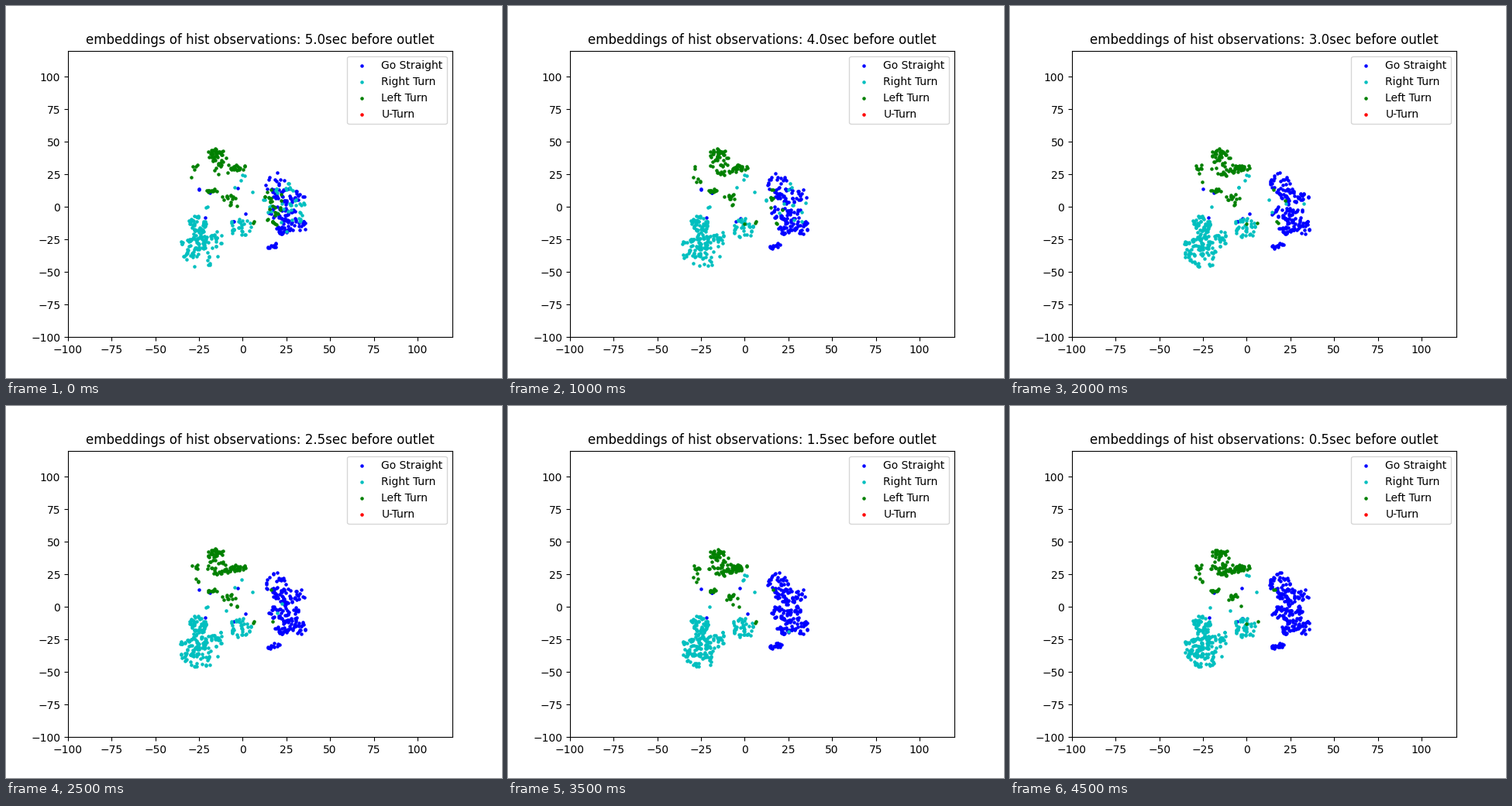
Recreate the animation shown at these times as a matplotlib script. Size 640 px wide and 480 px high, loop 5000 ms.

```python
import numpy as np
import matplotlib.pyplot as plt
from matplotlib.animation import FuncAnimation

FRAMES = 10
INTERVAL = 500
FADE = 0.55  # share of mixed-in dots kept from one step to the next

# Clusters are ellipses: centre x, y, radius x, y, first and last dot count
STRAIGHT = [
    (19, 18, 6, 8, 18, 40),
    (27, 9, 9, 6, 38, 58),
    (24, -5, 9, 7, 36, 62),
    (28, -16, 9, 6, 48, 56),
    (17, -30, 4, 2.5, 10, 22),
]
RIGHT = [
    (-26, -14, 5, 7, 58, 66),
    (-28, -28, 8, 6, 48, 52),
    (-25, -38, 11, 8, 28, 72),
    (-16, -24, 5, 7, 22, 26),
    (-1, -15, 6, 8, 28, 48),
]
LEFT = [
    (-15, 38, 5, 7, 46, 34),
    (-12, 29, 9, 4, 8, 56),
    (-3, 30, 4, 3, 20, 24),
    (-26, 25, 4, 8, 5, 13),
    (-18, 13, 3, 2, 12, 9),
    (-8, 8, 4, 3, 10, 12),
]
STRAYS = (-5, 3, 25, 23, 8, 5)


def make_sites(cluster, size, rng):
    """Sites spread over an ellipse, some of them in tight clumps."""
    x, y, rx, ry = cluster[:4]
    knots = int(0.6 * size) + 1
    angle = rng.uniform(0, 2 * np.pi, knots)
    radius = np.sqrt(rng.random(knots))
    base = np.column_stack([x + rx * radius * np.cos(angle),
                            y + ry * radius * np.sin(angle)])
    return base[np.arange(size) % knots] + rng.normal(0, 0.5, (size, 2))


def make_steps(clusters, mix, seed):
    """Dots of one class for every step, picked anew from fixed sites."""
    rng = np.random.default_rng(seed)
    groups = clusters + [STRAYS, mix]
    sites = [make_sites(g, int(1.3 * max(g[4:])) + 1, rng) for g in groups]
    steps = []
    for step in range(FRAMES):
        part = step / (FRAMES - 1)
        counts = [g[4] + (g[5] - g[4]) * part for g in groups]
        counts[-1] = mix[4] * FADE ** step
        steps.append(np.vstack([rng.permutation(s)[:round(n)]
                                for s, n in zip(sites, counts)]))
    return steps


fig, ax = plt.subplots(figsize=(6.4, 4.8), dpi=100)
ax.set(xlim=(-100, 120), ylim=(-100, 120),
       xticks=range(-100, 101, 25), yticks=range(-100, 101, 25))

# The last ellipse of each class mixes into the right-hand cluster and fades
classes = [
    ("Go Straight", "b", make_steps(STRAIGHT, (25, -8, 9, 12, 0, 0), 3)),
    ("Right Turn", "c", make_steps(RIGHT, (23, 1, 12, 22, 45, 0), 5)),
    ("Left Turn", "g", make_steps(LEFT, (18, 1, 7, 14, 28, 0), 8)),
    ("U-Turn", "r", [np.empty((0, 2))] * FRAMES),
]
clouds = [ax.scatter([], [], s=5, c=color, label=label)
          for label, color, _ in classes]
ax.legend(loc="upper right")
title = ax.set_title("")


def update(step):
    for cloud, (_, _, steps) in zip(clouds, classes):
        cloud.set_offsets(steps[step])
    seconds = 5 - 0.5 * step
    title.set_text(f"embeddings of hist observations: {seconds:.1f}sec before outlet")
    return [*clouds, title]


anim = FuncAnimation(fig, update, frames=FRAMES, interval=INTERVAL,
                     repeat=True, repeat_delay=0, blit=False)
plt.show()
```
